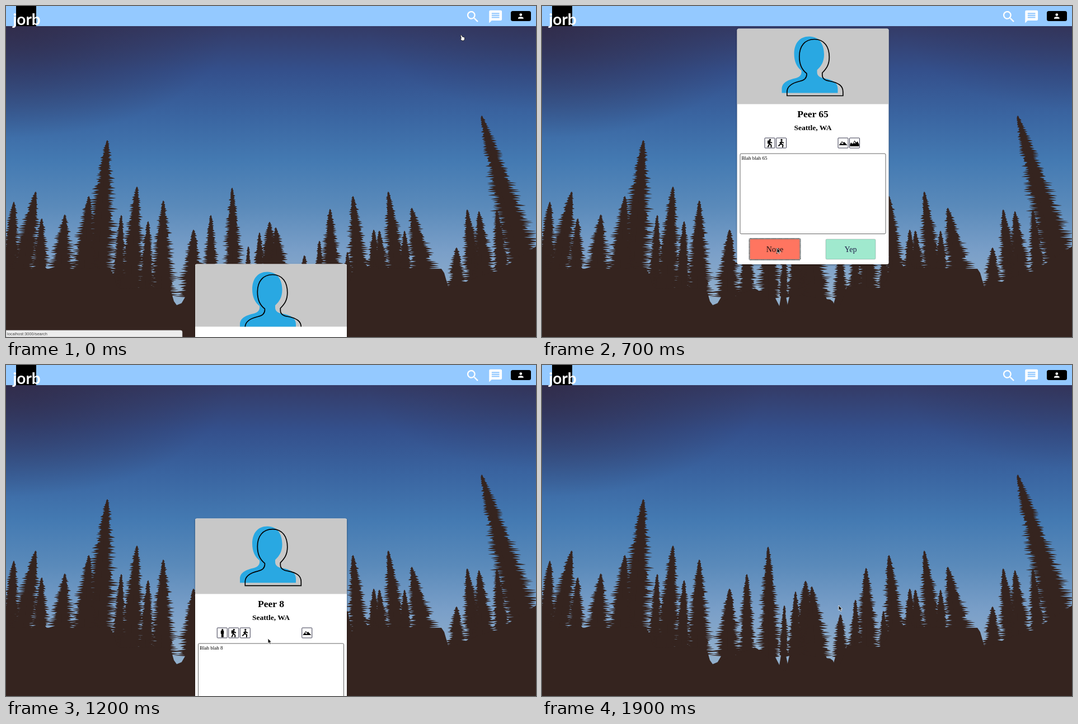
An HTML page with a canvas for the animation above (2000 ms loop, 947 px wide and 592 px high).

```html
<!DOCTYPE html>
<html lang="en">
<head>
<meta charset="utf-8">
<title>Hiking partner cards</title>
<style>
  html, body { margin: 0; width: 100%; height: 100%; overflow: hidden; background: #35241f; }
  canvas, svg.stage { position: absolute; left: 0; top: 0; width: 947px; height: 592px; }
  text { font-family: "Liberation Serif", serif; }
  .title { font-weight: bold; font-size: 17.5px; text-anchor: middle; }
  .place { font-weight: bold; font-size: 13.5px; text-anchor: middle; }
  .bio { font-size: 9px; }
  .label { font-size: 14px; text-anchor: middle; }
  .card { filter: drop-shadow(0 1px 1.5px rgba(0, 0, 0, .45)); }
  .brand { font: bold 28px Lato, sans-serif; text-anchor: middle; fill: #fff; }
  .status { font: 7.4px "Liberation Sans", sans-serif; fill: #444; }
</style>
</head>
<body>
<canvas id="forest" width="947" height="592"></canvas>
<svg class="stage" viewBox="0 0 947 592">
  <defs>
    <clipPath id="photoClip"><rect id="photoArea" width="271" height="135"/></clipPath>
    <path id="person" d="M129 14C147 14 155.500 28 155.500 46C155.500 60 150 67 143 74V78C143 85 149 88 157 89C172 92 180 97 180 108V115H80V108C80 97 90 92 103 89C112 87 116 83 115 75C107 69 102 59 102 45C102 26 112 14 129 14Z"/>
  </defs>
  <g id="cards"></g>
  <g id="status">
    <path d="M0 580H312Q315 580 315 583V592H0Z" fill="#ededed" stroke="#aaa" stroke-width=".7"/>
    <text class="status" x="2" y="589">localhost:3000/search</text>
  </g>
  <rect width="947" height="36" fill="#94c9ff"/>
  <rect x="18" width="36" height="36"/>
  <text class="brand" x="37" y="34">jorb</text>
  <g fill="#fff">
    <path transform="translate(820.500 5.500) scale(1.14)" d="M15.500 14h-.79l-.28-.27A6.500 6.500 0 1 0 13.730 14.430l.27.28v.79l5 4.990L20.490 19zM9.500 14a4.500 4.500 0 1 1 0-9a4.500 4.500 0 0 1 0 9z"/>
    <path transform="translate(861 5.500) scale(1.14)" d="M20 2H4a2 2 0 0 0-2 2V22l4-4h14a2 2 0 0 0 2-2V4a2 2 0 0 0-2-2zM18 14H6v-2h12zM18 11H6V9h12zM18 8H6V6h12z"/>
    <rect x="902" y="9" width="36" height="18" rx="3.500" fill="#000"/>
    <path transform="translate(912.600 10.800) scale(.6)" d="M12 12a4 4 0 1 0 0-8a4 4 0 0 0 0 8zM12 14c-2.700 0-8 1.300-8 4v2h16v-2c0-2.700-5.300-4-8-4z"/>
  </g>
  <path id="arrow" d="M0 0V9L2.200 7.200L3.700 10.500L5.300 9.700L3.900 6.600H6.500Z" fill="#111" stroke="#fff" stroke-width=".8"/>
  <path id="hand" d="M812 52.500Q813 51 814.500 53L815.500 55L819.500 56V59.500L818 62H814.500L811.500 58.500L813.500 58Z" fill="#fff" stroke="#222" stroke-width=".9"/>
</svg>
<script>
const $ = id => document.getElementById(id);
const lerp = (a, b, p) => a + (b - a) * p;

// Seeded random numbers keep the tree line the same on every load.
let seed = 7;
const random = () => (seed = seed * 16807 % 2147483647) / 2147483647;

const ctx = $('forest').getContext('2d');

function drawSky() {
  const sky = ctx.createLinearGradient(0, 36, 0, 520);
  ['#343b67', '#34508c', '#3a65a1', '#447ab2', '#5a8aba', '#7a9fc8', '#91afcc']
    .forEach((color, i, all) => sky.addColorStop(i / (all.length - 1), color));
  ctx.fillStyle = sky;
  ctx.fillRect(0, 0, 947, 592);
  shade(0, 400, .75);
  shade(947, 300, .35);
}

function shade(x, radius, alpha) {
  ctx.save();
  ctx.translate(x, 36);
  ctx.scale(1, .5);
  const glow = ctx.createRadialGradient(0, 0, 0, 0, 0, radius);
  glow.addColorStop(0, `rgba(48,40,66,${alpha})`);
  glow.addColorStop(1, 'rgba(48,40,66,0)');
  ctx.fillStyle = glow;
  ctx.fillRect(-radius, 0, radius * 2, radius);
  ctx.restore();
}

// Each tree: tip x, tip y, foot x, half width at the foot.
const FOOT = 520;
const trees = [
  [14, 350, 3, 28], [53, 332, 20, 36], [64, 380, 58, 25], [105, 373, 96, 34],
  [181, 240, 160, 42], [148, 340, 138, 36], [206, 374, 200, 18], [234, 323, 222, 31],
  [254, 385, 250, 19], [281, 348, 279, 29], [335, 400, 332, 29], [366, 374, 366, 20],
  [404, 325, 407, 24], [433, 430, 432, 10], [471, 386, 470, 30], [482, 396, 492, 30],
  [453, 405, 452, 17], [533, 446, 534, 18], [560, 420, 560, 15], [579, 363, 582, 27],
  [610, 440, 612, 15], [620, 340, 634, 29], [657, 400, 660, 22], [667, 402, 676, 22],
  [683, 332, 704, 28], [712, 402, 716, 20], [725, 361, 754, 36], [805, 432, 806, 26],
  [824, 364, 842, 27], [845, 367, 858, 29], [877, 364, 890, 24], [850, 196, 945, 46]
];

function drawTree([tipX, tipY, footX, half]) {
  const height = FOOT - tipY;
  for (const side of [-1, 1]) {
    ctx.beginPath();
    ctx.moveTo(tipX - side, tipY);
    for (let d = 2; d < height; d += 2.5 + 2.5 * random()) {
      const p = d / height, x = lerp(tipX, footX, p);
      const reach = side * (1.5 + half * p ** .75);
      ctx.lineTo(x + reach * (.65 + .55 * random()), tipY + d + 1);
      ctx.lineTo(x + reach * (.35 + .3 * random()), tipY + d + 2.5);
    }
    ctx.lineTo(footX + side * half, FOOT + 30);
    ctx.lineTo(footX - side * 2, FOOT + 30);
    ctx.fill();
  }
}

function drawGround() {
  const ridge = [0, 465, 185, 470, 198, 500, 290, 505, 300, 528, 380, 505, 430, 545, 447, 515,
    515, 525, 524, 540, 546, 500, 602, 505, 626, 465, 778, 470, 790, 502, 870, 475, 947, 430];
  ctx.beginPath();
  ctx.moveTo(0, 592);
  for (let i = 0; i < ridge.length; i += 2) {
    ctx.lineTo(ridge[i], ridge[i + 1]);
    ctx.lineTo(ridge[i] + 5, ridge[i + 1] + 8 * random());
  }
  ctx.lineTo(947, 592);
  ctx.fill();
}

drawSky();
ctx.fillStyle = '#35241f';
trees.forEach(drawTree);
drawGround();

const body = (limbs, pack) =>
  `<circle cx="9.500" cy="3.500" r="1.700"/><path d="${limbs}" fill="none" stroke="#000" stroke-width="1.900"/>${pack}`;
const icons = {
  stand: body('M9.500 5V11M8.500 10V17M10.500 10V17', '<rect x="6.500" y="5" width="5.500" height="6" rx="1"/>'),
  hike: body('M9 5.500L8.500 10.500L5.500 16.500M8.500 10L11.500 13V17M9.500 7L13 9', '<rect x="5" y="4.500" width="4" height="6" rx="1"/>'),
  run: body('M10 5.500L8.500 10L4 14.500M8.500 10L12 12.500L11.500 17M9.500 7L13.500 9M9 7L6 9', ''),
  hill: '<path d="M1.500 13L7 6L9.500 8.500L11 7L16.500 13Z"/><path d="M7 7.500L5 10.500L7 10L9 11.500L9.500 10Z" fill="#fff"/>',
  peak: '<path d="M1 15V11L3 8L5 11L9 4.500L12 8.500L14 6L17 11V15Z"/><path d="M9 6L6.500 10L9 9L11 10.500Z" fill="#fff"/>'
};

const iconRow = (names, center) => names.map((name, i) => {
  const x = center + (i - names.length / 2) * 20.5 + 1;
  return `<g transform="translate(${x} 195.500)"><rect width="18" height="18" rx="1" fill="#fff" stroke="#3b3b50"/>${icons[name]}</g>`;
}).join('');

const button = (x, color, ink, label) => `
  <rect x="${x}" y="376.500" width="89" height="36" rx="2" fill="${color}" stroke="#666" stroke-opacity=".45" stroke-width=".7"/>
  <text class="label" x="${x + 44.5}" y="399" fill="${ink}">${label}</text>
  <rect class="ring" x="${x - 1}" y="375.500" width="91" height="38" rx="2" fill="none" stroke="#555" stroke-width="2" stroke-dasharray="1.500 .7"/>`;

function addCard(number, paces, slopes) {
  const card = document.createElementNS('http://www.w3.org/2000/svg', 'g');
  card.setAttribute('class', 'card');
  card.innerHTML = `
    <rect width="271" height="421.500" rx="3" fill="#fff"/>
    <g clip-path="url(#photoClip)">
      <rect width="271" height="140" rx="3" fill="#c8c8c8"/>
      <use href="#person" fill="#29a8e2"/>
      <use href="#person" x="9.300" y="5" fill="none" stroke="#000" stroke-width="1.700"/>
    </g>
    <text class="title" x="135.500" y="158">Peer ${number}</text>
    <text class="place" x="135.500" y="181.500">Seattle, WA</text>
    ${iconRow(paces, 69)}${iconRow(slopes, 200)}
    <rect x="5.500" y="223.500" width="260" height="143.500" rx="2" fill="#fff" stroke="#666"/>
    <text class="bio" x="8" y="234">Blah blah ${number}</text>
    ${button(23, '#ff7560', '#1c1010', 'Nope')}${button(158.5, '#a0e9ce', '#20204a', 'Yep')}`;
  $('cards').append(card);
  return { node: card, rings: card.querySelectorAll('.ring') };
}

const first = addCard(65, ['hike', 'run'], ['hill', 'peak']);
const second = addCard(8, ['stand', 'hike', 'run'], ['hill']);

const HOME = [338, 40.5], RISE = 421;

// Remaining share of the rise at each step; zero once the card rests.
const riseFirst = [1, .355, .052, .004];
const riseSecond = [.556, .14, .014, .002];

function poseCard({ node, rings }, step, start, leave, rise, dir) {
  const gone = step - leave;
  node.style.display = step >= start && gone < 2 ? '' : 'none';
  const dx = gone < 0 ? 0 : gone ? dir * 454 : -dir * 10.5;
  const dy = (rise[step - start] || 0) * RISE;
  node.setAttribute('transform', `translate(${HOME[0] + dx} ${HOME[1] + dy})`);
  node.style.opacity = gone > 0 ? .55 : 1;
  rings.forEach((ring, i) => ring.style.display = gone >= 0 && i === (dir > 0 ? 1 : 0) ? '' : 'none');
}

// Pointer stops: step, x, y.
const stops = [[0, 812, 52], [1, 765, 140], [2, 688, 240], [3, 565, 345], [4, 455, 420], [5, 420, 433],
  [10, 420, 433], [11, 438, 468], [12, 468, 489], [13, 488, 448], [14, 503, 419], [15, 530, 430], [19, 530, 430]];

function pointerAt(step) {
  const i = Math.max(1, stops.findIndex(stop => stop[0] >= step));
  const [a, b] = [stops[i - 1], stops[i]];
  const p = (step - a[0]) / (b[0] - a[0]);
  return [lerp(a[1], b[1], p), lerp(a[2], b[2], p)];
}

function render(step) {
  poseCard(first, step, 0, 7, riseFirst, -1);
  poseCard(second, step, 12, 17, riseSecond, 1);
  $('photoArea').setAttribute('height', step ? 135 : 112);
  $('status').style.display = $('hand').style.display = step ? 'none' : '';
  $('arrow').style.display = step ? '' : 'none';
  $('arrow').setAttribute('transform', `translate(${pointerAt(step)})`);
}

const startTime = performance.now();
function tick() {
  render(Math.floor((performance.now() - startTime) % 2000 / 100));
  requestAnimationFrame(tick);
}
tick();
</script>
</body>
</html>
```
